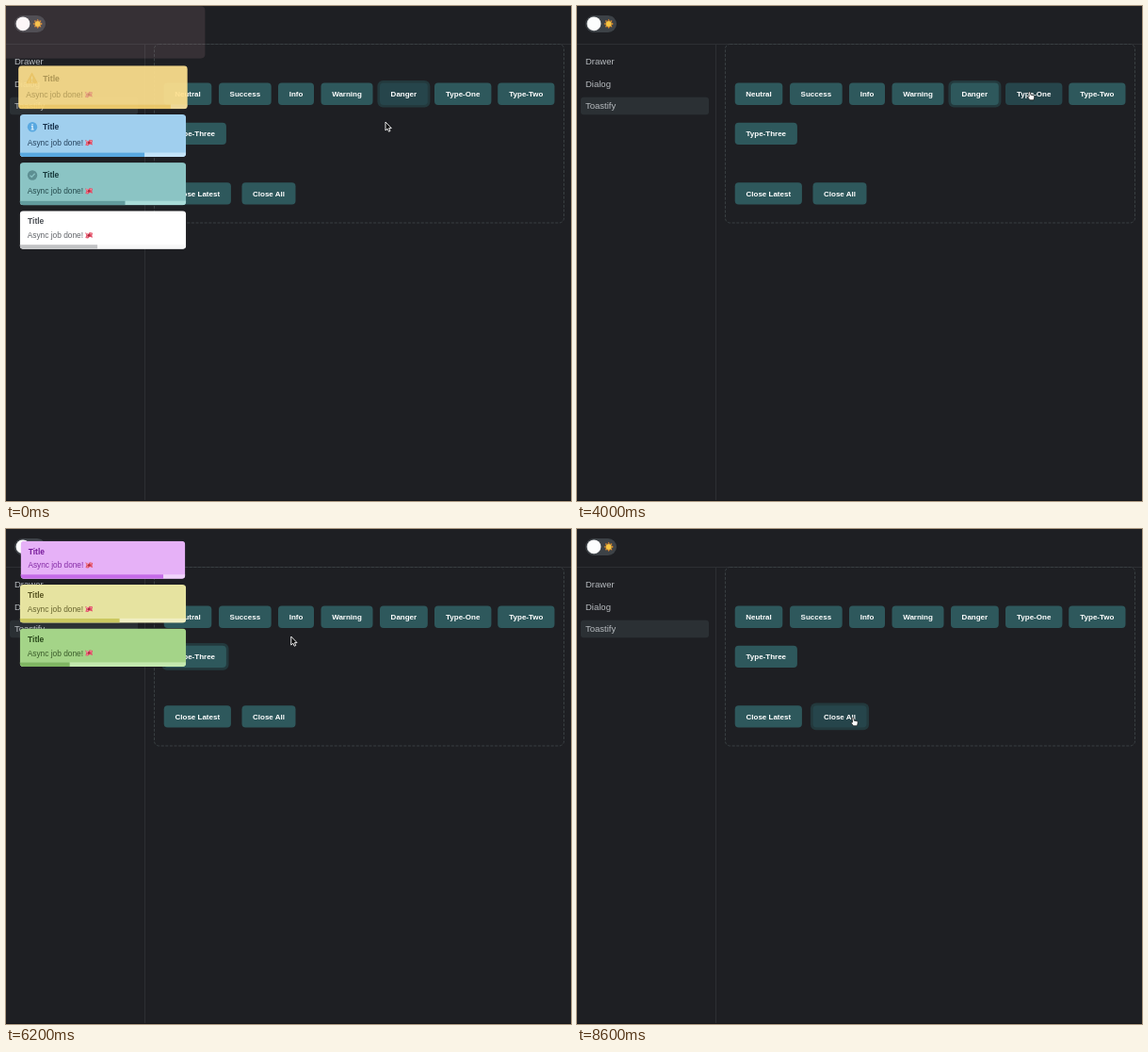
These frames come from a looping animation (600x525 px, 8700 ms). An HTML page:

```html
<!DOCTYPE html>
<html lang="en">
<head>
<meta charset="utf-8">
<title>Toast notifications</title>
<style>
  html, body { margin: 0; width: 100%; height: 100%; overflow: hidden; background: #1e1f23; }
  svg { display: block; width: 600px; height: 525px; font-family: Helvetica, Arial, "Liberation Sans", sans-serif; }
  .nav { font-size: 9.5px; fill: #b7bbbf; }
  .label { font-size: 8px; font-weight: bold; fill: #fff; text-anchor: middle; }
  .title { font-size: 8.5px; font-weight: bold; }
  .body { font-size: 8.35px; }
</style>
</head>
<body>
<svg id="stage" viewBox="0 0 600 525"></svg>
<script>
const LOOP = 8700, STEP = 100, LIFE = 3000, EXIT = 250, CLOSE_ALL = 7700;
const LEFT = 14.7, TOP = 12.5, WIDTH = 176.5, GAP = 6;
const stage = document.getElementById('stage');

// name, x, y, width
const buttons = [
  ['Neutral', 167.7, 81.5, 50.6], ['Success', 226, 81.5, 55.7], ['Info', 289, 81.5, 38],
  ['Warning', 334.5, 81.5, 55], ['Danger', 397, 81.5, 50.8], ['Type-One', 455, 81.5, 60.4],
  ['Type-Two', 522.2, 81.5, 60.3], ['Type-Three', 167.7, 123.7, 66.2],
  ['Close Latest', 167.7, 187.2, 71.2], ['Close All', 250.5, 187.2, 57]
].map(([name, x, y, w]) => ({ name, x, y, w, h: 23.4 }));

// time at which each button takes the focus
const focusSteps = [[0, 'Danger'], [4100, 'Type-One'], [5000, 'Type-Two'], [5800, 'Type-Three'],
  [6700, 'Warning'], [7000, 'Info'], [CLOSE_ALL, 'Close All']];

// background, text, bar, track
const themes = {
  neutral: ['#ffffff', '#4b4f54', '#c2c3c5', '#f8f8f8'],
  success: ['#8bc4c4', '#17393b', '#629b9d', '#a8dbd8'],
  info: ['#a0cfee', '#16304a', '#58a8e0', '#c3e3f8'],
  warning: ['#fde08e', '#57430c', '#f3c046', '#fdecba'],
  danger: ['#f5b8c3', '#6d1822', '#f0798b', '#fcd5dc'],
  one: ['#a4d488', '#2b4a1c', '#7fb562', '#c3e8ae'],
  two: ['#e6e3a0', '#57531f', '#cbc860', '#f0eec2'],
  three: ['#e6b1f7', '#76199a', '#c56be8', '#f1d4fb']
};

const disc = '<circle cx="13.3" cy="13.4" r="5.2"/>';
const icons = {
  success: disc + '<path d="M10.8 13.5l1.8 1.8 3.3-3.6" fill="none" stroke="#8bc4c4" stroke-width="1.3"/>',
  info: disc + '<path d="M13.3 10.2v1.4M12.2 12.7h1.2v3.4M11.9 16.1h3" fill="none" stroke="#e4f3fd" stroke-width="1.2"/>',
  warning: '<path d="M14.2 7.8l5.5 10.4h-11z" stroke="#f2bb3f" stroke-linejoin="round"/>' +
    '<path d="M14.2 11.3v3.5M14.2 15.8v1.2" stroke="#fde9b0" stroke-width="1.1"/>',
  danger: disc + '<path d="M11.4 11.5l3.8 3.8M15.2 11.5l-3.8 3.8" stroke="#f9cfd6" stroke-width="1.1"/>'
};

// newest first; grow is how long a toast takes to open its slot
const toasts = [
  ['info', 7050], ['warning', 6730, 183], ['three', 5800], ['two', 5000], ['one', 4100],
  ['danger', -110], ['warning', -300], ['info', -750], ['success', -1100], ['neutral', -1600]
].map(([kind, start, grow = 110]) => ({
  kind, start, grow, h: icons[kind] ? 45.2 : 40.5,
  end: Math.min(start + LIFE, start > 0 && start < CLOSE_ALL ? CLOSE_ALL : Infinity)
}));

const pointer = [
  [-400, 418, 95], [-40, 408, 101], [0, 403, 123], [300, 398, 220], [600, 376, 331], [900, 350, 274],
  [1300, 315, 300], [1800, 290, 305], [2200, 282, 262], [2450, 279.5, 214], [2500, 279.5, 209],
  [2900, 281, 205], [3300, 335, 155], [3700, 458, 97], [4000, 480.5, 91], [4300, 481, 91],
  [4800, 545, 92], [5100, 547, 93], [5500, 233, 129], [5700, 221.5, 139], [5900, 221, 138],
  [6300, 330, 106], [6550, 362, 95], [6690, 350, 94], [6760, 322, 95], [6900, 318, 95],
  [7100, 316, 96], [7500, 294, 197], [7800, 293, 200], [8700, 293, 200]
];
const fadeKeys = [[0, 0], [110, .11], [170, .42], [300, .93], [400, 1]];
const settleKeys = [[300, 0], [400, -.01], [700, -.01], [740, 0]];

const clamp = v => Math.max(0, Math.min(1, v));

// linear interpolation over rows of [time, value, ...]
function at(keys, t, col = 1) {
  if (t <= keys[0][0]) return keys[0][col];
  for (let i = 1; i < keys.length; i++) {
    const a = keys[i - 1], b = keys[i];
    if (t <= b[0]) return a[col] + (b[col] - a[col]) * (t - a[0]) / (b[0] - a[0]);
  }
  return keys[keys.length - 1][col];
}

const rect = (x, y, w, h, r, fill, extra = '') =>
  `<rect x="${x}" y="${y}" width="${w}" height="${h}" rx="${r}" fill="${fill}" ${extra}/>`;
const text = (cls, x, y, str, extra = '') => `<text class="${cls}" x="${x}" y="${y}" ${extra}>${str}</text>`;

function sun() {
  let rays = '';
  for (let i = 0; i < 8; i++) rays += `<path d="M-1.3-3.2L0-5.1 1.3-3.2z" transform="rotate(${i * 45})"/>`;
  return `<g transform="translate(33.7 18.9)" fill="#e0892a">${rays}<circle r="3" fill="#f8c440"/></g>`;
}

function page() {
  const nav = [['Drawer', 62.3], ['Dialog', 86], ['Toastify', 109.3]];
  return rect(0, 0, 600, 525, 0, '#1e1f23') +
    '<path d="M0 40.5H600M147.5 41V525" stroke="#2d2f33"/>' +
    rect(157.5, 40.5, 435, 189.5, 5, 'none', 'stroke="#393f42" stroke-dasharray="3 1.6"') +
    rect(0, 524, 600, 1, 0, '#15161a') +
    rect(9, 10, 33, 18, 9, '#3d4247') + '<circle cx="18" cy="18.8" r="7.4" fill="#fdfefe"/>' + sun() +
    rect(4, 96.8, 136, 18.5, 3, '#2b3034') +
    nav.map(([s, y]) => text('nav', 9, y, s)).join('');
}

const buttonMarkup = b =>
  `<g>${rect(b.x - 2.6, b.y - 2.6, b.w + 5.2, b.h + 5.2, 6, '#23393d')}` +
  rect(b.x, b.y, b.w, b.h, 4, '#2e585c') + text('label', b.x + b.w / 2, b.y + 14.6, b.name) + '</g>';

const party = y => `<g transform="translate(73.4 ${y})">
  <path d="M-4-3L-.6-1.4.6-3.2 4-2.4 3.2.4 4 2.6.8 1.6-1 3.2-3.8 2.8-2.8 0z" fill="#e4526a"/>
  <path d="M-3-1.6l2 .9M1.4-1.8l1.4.4M-2.4 2l1.2-.6" stroke="#f9b9bf" stroke-width=".8"/>
  <circle r="1.2" fill="#a92e3f"/></g>`;

function toastMarkup({ kind, h }, i) {
  const [bg, ink, bar, track] = themes[kind], icon = icons[kind];
  const titleX = !icon ? 8.3 : kind === 'warning' ? 25.7 : 24.3;
  const titleY = icon ? 16.2 : 14, bodyY = icon ? 33.2 : 29;
  const iconInk = kind === 'success' ? '#5d8f92' : bar;
  return `<g><clipPath id="clip${i}">${rect(0, 0, WIDTH, h, 4, '#000')}</clipPath>` +
    `<g clip-path="url(#clip${i})">${rect(0, 0, WIDTH, h, 0, bg)}<g class="content">` +
    rect(0, h - 4.6, WIDTH, 4.6, 0, track) + rect(0, h - 4.6, WIDTH, 4.6, 0, bar, 'class="bar"') +
    (icon ? `<g fill="${iconInk}">${icon}</g>` : '') +
    text('title', titleX, titleY, 'Title', `fill="${ink}"`) +
    text('body', 8, bodyY, 'Async job done!', `fill="${ink}" fill-opacity=".88"`) +
    party(bodyY - 3.1) + '</g></g></g>';
}

const cursors = `<g id="cursor">
  <path d="M0 0V9L2.1 7.2 3.5 10.2 5 9.5 3.7 6.6H6.3z" fill="#0b0b0c" stroke="#fff" stroke-width=".9"/>
  <path d="M-.9.6Q0-.6.9.6L1.3 3.2 4.4 3.8Q5.5 4.2 5.2 5.8L4.5 8.8H.6L-1.8 5.9Q-2.1 4.5-.3 5.1z"
    fill="#fff" stroke="#111" stroke-width=".7"/></g>`;

stage.innerHTML = page() + `<g id="buttons">${buttons.map(buttonMarkup).join('')}</g>` +
  `<g id="toasts">${toasts.map(toastMarkup).reverse().join('')}</g>` + cursors;

const buttonEls = [...document.getElementById('buttons').children];
const toastEls = [...document.getElementById('toasts').children].reverse();
const cursor = document.getElementById('cursor');
const [arrow, hand] = cursor.children;

function isOver(b, t) {
  const x = at(pointer, t, 1), y = at(pointer, t, 2);
  return x >= b.x && x <= b.x + b.w && y >= b.y && y <= b.y + b.h;
}

const mix = (a, b, k) => `rgb(${a.map((v, i) => Math.round(v + (b[i] - v) * k))})`;

function drawButtons(t) {
  const focus = focusSteps.filter(s => s[0] <= t).pop()[1];
  buttons.forEach((b, i) => {
    const hover = [50, 100, 150].filter(d => isOver(b, t - d)).length / 3;
    const [ring, face] = buttonEls[i].children;
    ring.style.display = b.name === focus ? '' : 'none';
    face.setAttribute('fill', mix([46, 88, 92], [38, 69, 75], hover));
  });
}

function drawToasts(t) {
  let y = TOP;
  toasts.forEach((toast, i) => {
    const el = toastEls[i], age = t - toast.start, out = (t - toast.end) / EXIT;
    const live = age >= 0 && out < 1;
    el.style.display = live ? '' : 'none';
    if (!live) return;
    const shown = at(fadeKeys, age), hidden = 1 - shown, gone = clamp(out);
    const scale = 1 + .26 * hidden + at(settleKeys, age) + .08 * gone;
    const cy = y + toast.h / 2 - 9 * hidden * hidden;
    el.setAttribute('transform', `translate(${LEFT + WIDTH / 2} ${cy}) scale(${scale}) ` +
      `translate(${-WIDTH / 2} ${-toast.h / 2})`);
    el.setAttribute('opacity', shown * (1 - gone));
    el.querySelector('.content').setAttribute('opacity', clamp((shown - .88) / .12));
    el.querySelector('.bar').setAttribute('width', WIDTH * clamp(1 - age / LIFE));
    y += (toast.h + GAP) * clamp(age / toast.grow);
  });
}

function drawCursor(t) {
  const over = buttons.some(b => isOver(b, t));
  cursor.setAttribute('transform', `translate(${at(pointer, t, 1)} ${at(pointer, t, 2)})`);
  arrow.style.display = over ? 'none' : '';
  hand.style.display = over ? '' : 'none';
}

const origin = performance.now();
function frame() {
  const elapsed = Math.max(0, performance.now() - origin) % LOOP;
  const t = Math.floor(elapsed / STEP) * STEP;
  drawButtons(t);
  drawToasts(t);
  drawCursor(t);
  requestAnimationFrame(frame);
}
frame();
</script>
</body>
</html>
```
